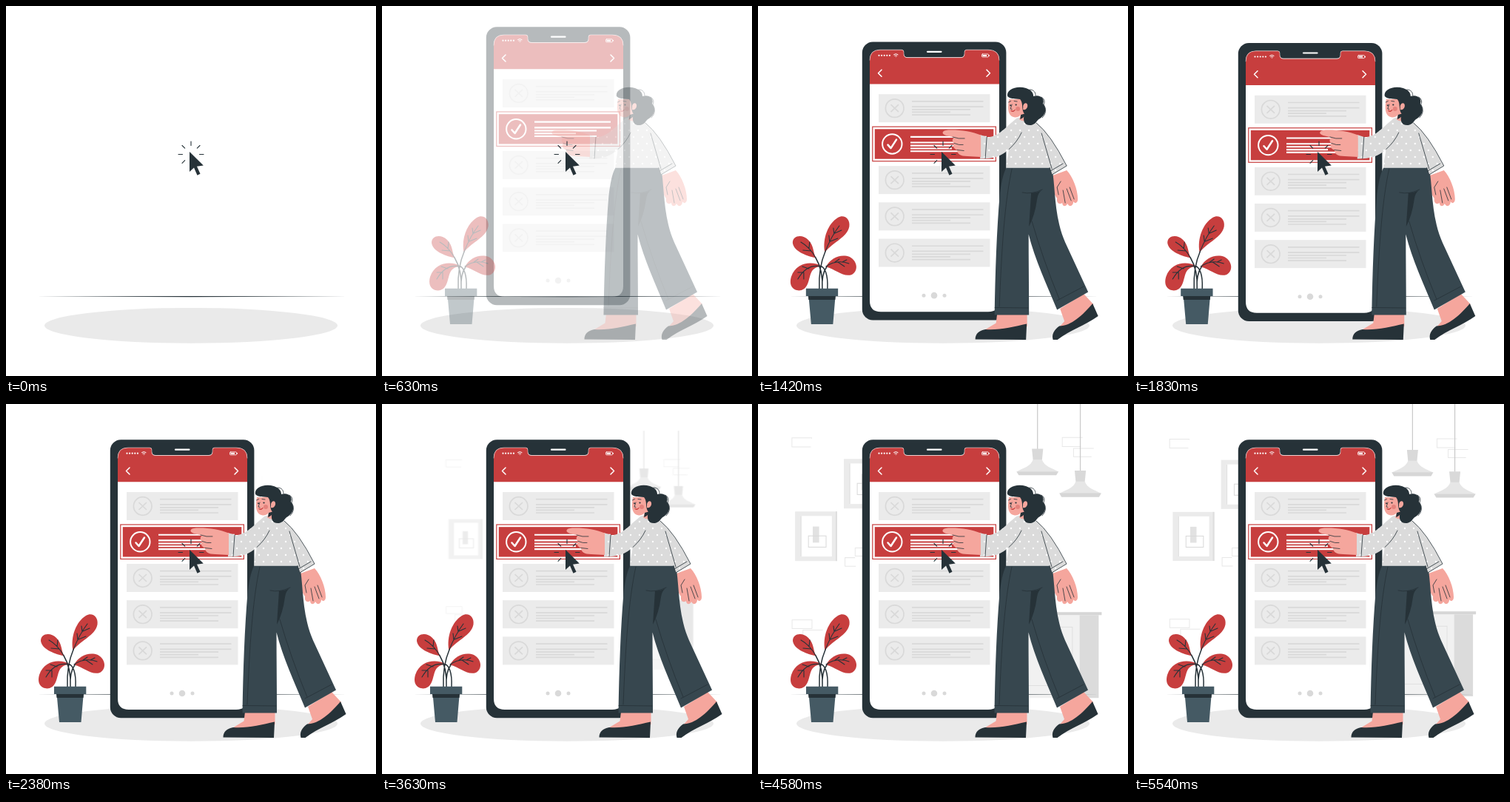
Recreate the animation shown at these times as an HTML page. Size 500 by 500 pixels, loop 5.58 s.

```html
<!DOCTYPE html>
<html lang="en">
<head>
<meta charset="utf-8">
<title>Mobile choice</title>
<style>
  html, body { margin: 0; width: 100%; height: 100%; overflow: hidden; background: #fff; }
  svg { display: block; width: 100%; height: 100%; }
  .dark { fill: #263238; }
  .red { fill: #c73e3e; }
  .skin { fill: #f5a69d; }
  .pants { fill: #37474f; }
  .white { fill: #fff; }
  .ink, .thin { fill: none; stroke: #263238; stroke-linecap: round; stroke-linejoin: round; }
  .ink { stroke-width: 1.5; }
  .thin { stroke-width: .8; }
  .light { fill: none; stroke: #fff; stroke-linecap: round; stroke-linejoin: round; }
  .grey { fill: none; stroke: #d9d9d9; stroke-width: 1.7; }
  .pale { fill: none; stroke: #e8e8e8; }
</style>
</head>
<body>
<svg viewBox="0 0 500 500">
  <defs>
    <pattern id="dots" width="12" height="18" patternUnits="userSpaceOnUse" patternTransform="translate(3 2)">
      <rect width="12" height="18" fill="#dbdbdb"/>
      <circle class="white" cx="3" cy="4" r="1.2"/>
      <circle class="white" cx="9" cy="13" r="1.2"/>
    </pattern>
    <g id="card">
      <rect x="163" width="150.5" height="38" fill="#ebebeb"/>
      <circle class="grey" cx="184.7" cy="19" r="12.3"/>
      <path class="grey" d="M179.5 14l10.5 10m0-10l-10.5 10M208 9.7h96.5M208 16.9h96.5M208 20.8h79M208 24.3h52M208 28h79"/>
    </g>
    <g id="picture">
      <rect x="53" y="146" width="56" height="66" fill="#ebebeb"/>
      <path d="M107 146h2v66h-2z" fill="#dedede"/>
      <rect class="white" x="60" y="152" width="42" height="54"/>
      <path d="M60 152h1.5v54H60z" fill="#e0e0e0"/>
      <rect x="76.5" y="166" width="8.5" height="21.5" fill="#e2e2e2"/>
      <rect class="grey" x="70.8" y="178.5" width="23.5" height="15" style="stroke-width:1"/>
    </g>
    <g id="lamp">
      <path d="M376 -29V63" stroke="#c9c9c9" stroke-width="1.2"/>
      <path d="M368.5 62.5h15l-1.5 15h-12z" fill="#d9d9d9"/>
      <path d="M370 77h12c3 9 13 11 22 16h-56c9-5 19-7 22-16z" fill="#e6e6e6"/>
      <path d="M348 92.7h56l-3 5h-50z" fill="#d6d6d6"/>
    </g>
    <clipPath id="stage"><path d="M0 0h500v500H0z"/></clipPath>
  </defs>

  <g id="room" clip-path="url(#stage)">
    <path class="pale" d="M75 49v-1H48.8v12H74M49 290.5h26.5v11.5H49zM90 304H63.5v11M146 194.5h-13v11h13M133 207.5h-13.5v11.5H134M436 47.5h-27v12h25M451 62h-27v11h24"/>
    <use href="#picture" x="65" y="-70"/>
    <use href="#picture"/>
    <use href="#lamp"/>
    <use href="#lamp" x="57" y="29"/>
    <path d="M352 284h80v110.5h-80z" fill="#f1f1f1"/>
    <path d="M432 284h25.5v110.5H432z" fill="#dbdbdb"/>
    <path d="M350 280h111.5v4H350z" fill="#d6d6d6"/>
    <path class="pale" d="M357 300h65.5v78H357z" style="stroke:#e0e0e0"/>
  </g>

  <ellipse cx="250" cy="431.8" rx="198" ry="23.9" fill="#eaeaea"/>
  <path class="dark" d="M41 392.5L250 391.9 461 392.5 250 393.3z"/>

  <g id="phone">
    <rect class="dark" x="140.8" y="48.3" width="194.6" height="376" rx="14.5"/>
    <path class="white" d="M151 73q0-14 14-14h29q3 0 3 3v2q0 5 5 5h72q5 0 5-5v-2q0-3 3-3h29q15 0 15 14v325q0 15-15 15H166q-15 0-15-15z"/>
    <path class="red" d="M151 105.3V73q0-14 14-14h29q3 0 3 3v2.500q0 5 5 5h72q5 0 5-5v-2.500q0-3 3-3h29q15 0 15 14v32.300z"/>
    <path class="light" d="M151 73q0-14 14-14h29q3 0 3 3v2.500q0 5 5 5h72q5 0 5-5v-2.500q0-3 3-3h29q15 0 15 14" stroke-width=".5"/>
    <path class="light" d="M229 61.7h18.5" stroke-width="2.2"/>
    <path class="light" d="M163.5 66.7h14.6" stroke-width="2.2" stroke-dasharray="0 3.6"/>
    <path class="light" d="M183.5 65.5q2.8-2.3 5.6 0M184.8 67q1.5-1.2 3 0M186.3 68.5v0" stroke-width="1"/>
    <rect class="light" x="302.5" y="64.8" width="9" height="4" rx="1" stroke-width=".8"/>
    <path class="white" d="M303.5 65.8h5.5v2h-5.5zM312 66h1v1.6h-1z"/>
    <path class="light" d="M167 86l-4.5 4.5 4.5 4.5M309 86l4.5 4.5-4.5 4.5" stroke-width="1.5"/>
    <use href="#card" y="119"/>
    <use href="#card" y="216"/>
    <use href="#card" y="265.2"/>
    <use href="#card" y="314.4"/>
    <rect class="white" x="154.8" y="163" width="166.6" height="46.5" stroke="#c73e3e" stroke-width="1.2"/>
    <rect class="red" x="157.8" y="166.2" width="160.5" height="40.3"/>
    <circle class="light" cx="181.3" cy="186.3" r="13.2" stroke-width="2"/>
    <path class="light" d="M175.5 187.5l4 4.5 7.5-11.5" stroke-width="2.5"/>
    <path class="light" d="M206 176.7h103M206 184.4h103M206 188.5h84M206 192.3h56M206 196.1h84" stroke-width="2.1" style="stroke-linecap:butt"/>
    <g fill="#d9d9d9">
      <circle cx="224" cy="391" r="2.5"/><circle cx="238" cy="391" r="4.3"/><circle cx="252" cy="391" r="2.5"/>
    </g>
  </g>

  <g id="plant">
    <g class="red">
      <path d="M90.5 333C87 314 95 294 108 286c9-5 17 2 15.5 12-3 15-21 20-33 35z"/>
      <path d="M78.5 340.5C62 337 48 330 47 320c0-10 13-12 21-4 8 8 6 16 10.5 24.5z"/>
      <path d="M86 351.5c-12-7-34-6-41 14.5-4 14 5 20 14 18 12-4 9-22 16-28 3-3 8-4 11-4.5z"/>
      <path d="M92 352.5c6-12 20-18 32-13.5 11 6 12 19 3 24-12 4-21-7-35-10.5z"/>
    </g>
    <path class="ink" d="M83 382c-1-22 2-36 8-50M87 382c1-20-3-32-9-42M94 382c1-20-4-29-9-30.5M87 382c-1-16 2-24 6-29.5"/>
    <path class="thin" style="stroke-width:1.1" d="M91 332c5-13 10-23 19-35M97 319l-1-9M98 318l10-4M103 308l-1-8M104 307l9-4M78 340c-5-9-11-16-20-21M72 331l-11-1M69 328l1-9M85 352c-14-3-24 5-31 17M69 355l-9-3M62 360l-8 0M62 360l0 9M92 352c10-7 20-8 31-4M103 347l7-5M108 346l9 6M114 346l6-3"/>
    <path d="M68.5 391h36.300l-3.300 39H72zM65 381.8h43.300v10.200H65z" fill="#455a64"/>
    <path class="dark" d="M68 392h37l-.500 5H68.500z"/>
  </g>

  <g id="woman">
    <path class="skin" d="M398 229l19-7c8 8 15 26 15 39 0 5-4 7-6 3 0 7-6 8-8 3-2 5-7 4-7-1-4 3-8 0-7-6-3-4-7-12-7-22z"/>
    <path class="thin" d="M409 237l-5 8 2 10M412 249l3 17M417 247l6 16M421 245l6 16"/>
    <path class="skin" d="M408 409l32-20 13 14-30 32-17 0 8-9zM323 416h40.500v17l-40 7-17-2.500 15-9z"/>
    <path class="dark" d="M398.500 451c-2-7 1-13 8.500-18.500 16 0 32-15 45-30.500l7.500 17c-18 13-37 18-55 32zM293.500 450.500c0-7.500 5-12 13.500-13.500 18 1.500 38-3.500 56-7.500l-1 21.500z"/>
    <path class="pants" d="M335.500 218.500H397c4 20 3 47 10 77 2 9 5 17 8 24l31 67-42 24c-14-34-30-68-38.500-102 0 35 .500 72 .500 109H319.500c1-60 3-115 7-162 2-15 4-28 9-37z"/>
    <path class="dark" d="M369 252.500q8 0 14-3.500-5 4-6 12-3 22-11 37z"/>
    <path class="thin" d="M320 407.500l45 .5M404 398l36-19M343 220c-10 45-14 110-17 186M357 252q13 3 27-4M370 291q15 52 37 105"/>
    <path d="M349 152c7-3 17-2 23 3 16 10 32 37 45 61l-20 12-3-9.500h-58.500c0-10 3-18 3-25-8 9-20 13-38.500 13V174l9 3c15 1 25-13 40-25z" fill="url(#dots)"/>
    <path class="thin" d="M356 171q-6 13-17 22.500M309 177l-2 29M383 172l14 48M395 223l17-10M376 158q19 15 41 58l-20 12-3-9.500"/>
    <path class="skin" d="M301 174.500c-12-5-28-7.500-44-7-9 .5-10 5.500-3 7.500l11 2.500c-4 3-2 7 0 8-3 4 0 8 4 9 0 5 4 8.500 14 8.500l18 1z"/>
    <path class="thin" d="M263 177q8 3 16 2M265 185.500q7 3 12 2M269 194.500l9 1"/>
    <path class="skin" d="M339 126c-2 12-2 23 8 24.500q6 0 8-4l-2 7q8 5 13-2l-1-26z"/>
    <path class="dark" d="M355 147l-1 6q6-2 8-8z"/>
    <path class="dark" d="M337 122c-2-9 12-15 25-11 9 3 10 8 10 11 9-3 16 3 13 10 6 8 3 15-4 20-4 1-5 8-12 9-9 1-12-6-9-15-5-7-1-14-6-20-7-1-13 0-17-4z"/>
    <path class="skin" d="M358 135c2-6 7-4 6 1-1 3-3 5-6 4z"/>
    <path class="thin" d="M367 113c6 0 8 4 8 8M383 123q6 4 3 10 6 10-2 18M338.500 130l3-1.500M346 128.500l4 .5M343 133l-2 6 2 .5"/>
    <circle class="dark" cx="341" cy="134.300" r="1"/><circle class="dark" cx="348.500" cy="133.500" r="1.100"/>
    <circle class="red" cx="351" cy="139" r="3" opacity=".35"/>
    <path d="M342 141.500q3 2 5-1" fill="none" stroke="#c73e3e" stroke-width="1.300" stroke-linecap="round"/>
  </g>

  <path class="dark" d="M248 197l18.800 18.500-8.800 1.200 4.500 10-4 2-4.500-10.200-6 5.500z"/>
  <path class="ink" d="M250 183v5.500M233 200.500h5.500M261.500 200.500h5.500M238 188.500l3.700 3.700M262 188.500l-3.700 3.700M238 212.300l3.700-3.700" style="stroke-width:1.100"/>
</svg>

<script>
const LOOP = 5580;
const HOLD = 170;
const SLIDE = 2070;
const ZOOM = 3500;
const [phone, plant, woman, room] =
  ["phone", "plant", "woman", "room"].map(id => document.getElementById(id));

const cubic = (a, b, t) => 3 * (1 - t) ** 2 * t * a + 3 * (1 - t) * t * t * b + t ** 3;

// Overshooting ease: cubic-bezier(.36, -.01, .5, 1.38)
function ease(x) {
  if (x <= 0) return 0;
  if (x >= 1) return 1;
  let low = 0, high = 1;
  for (let i = 0; i < 24; i++) {
    const mid = (low + high) / 2;
    if (cubic(.36, .5, mid) < x) low = mid; else high = mid;
  }
  return cubic(-.01, 1.38, low);
}

function place(el, progress, transform) {
  el.setAttribute("opacity", Math.max(0, Math.min(1, progress)));
  el.setAttribute("transform", transform);
}

function draw(now) {
  const time = now % LOOP;
  const slide = time < HOLD ? 0 : ease(time / SLIDE);
  const zoom = ease((time - SLIDE) / ZOOM);
  const shift = 30 * (1 - slide);
  place(phone, slide, `translate(0 ${-shift})`);
  place(plant, slide, `translate(${shift} 0)`);
  place(woman, slide, `translate(${-shift} 0)`);
  place(room, zoom, `translate(255 198.5) scale(${.5 + zoom / 2}) translate(-255 -198.5)`);
}

const start = performance.now();
function tick() {
  draw(performance.now() - start);
  requestAnimationFrame(tick);
}
tick();
</script>
</body>
</html>
```
